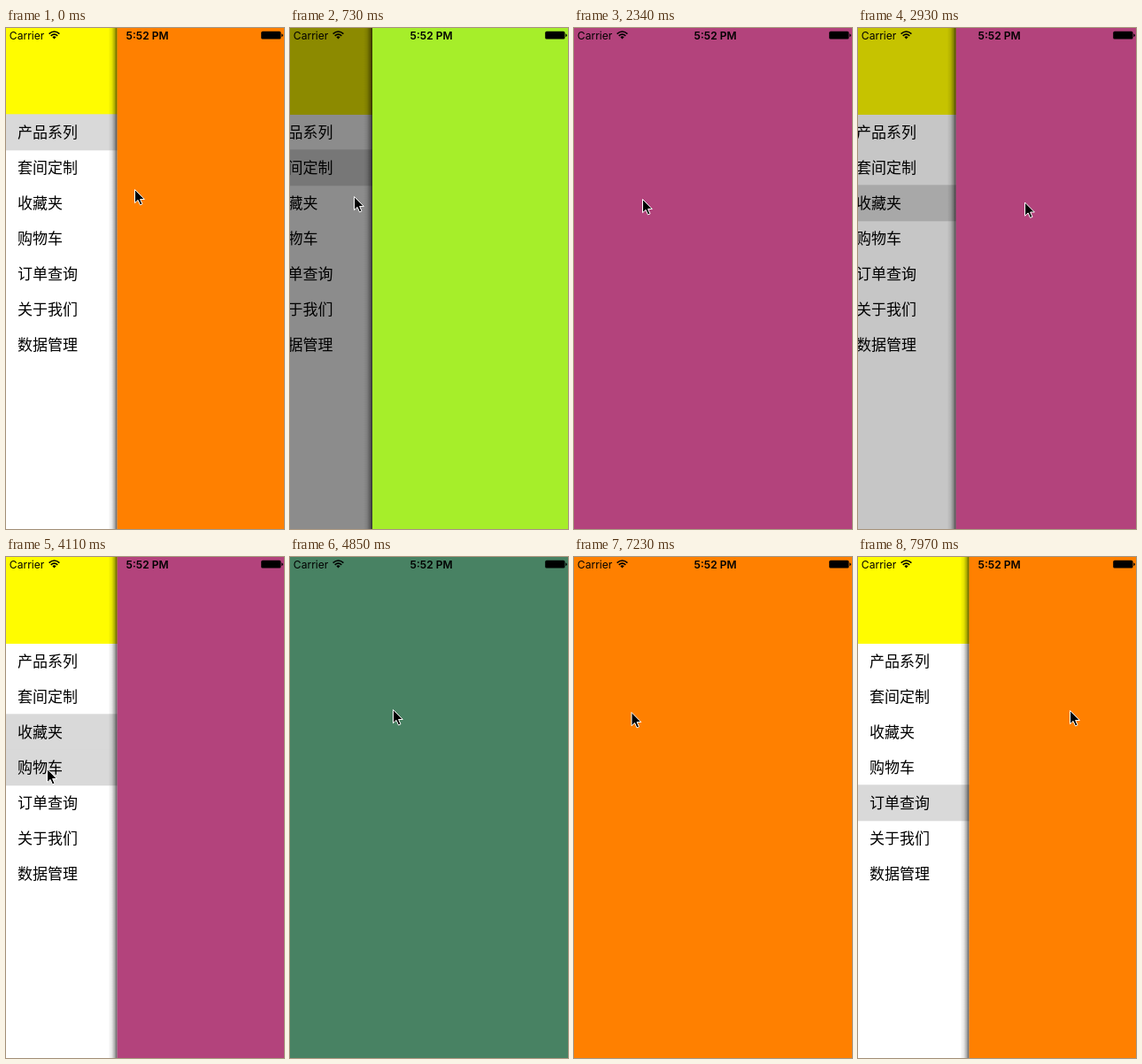
Animation, 314 px wide and 566 px high, one loop 8000 ms. Source, as an HTML page:

```html
<!DOCTYPE html>
<html lang="zh-CN">
<head>
<meta charset="utf-8">
<title>Drawer menu</title>
<style>
  html, body { margin: 0; width: 100%; height: 100%; overflow: hidden; background: #000; }
  svg { display: block; width: 100vw; height: 100vh; }
  .row { font: 17px "Noto Sans CJK SC", "Noto Sans CJK", sans-serif; }
  .status { font: 12.1px Inter, sans-serif; }
  .time { font-weight: 600; text-anchor: middle; }
</style>
</head>
<body>
<svg viewBox="0 0 314 566" xmlns="http://www.w3.org/2000/svg">
  <defs>
    <linearGradient id="shade">
      <stop offset="0" stop-opacity="0"/>
      <stop offset=".4" stop-opacity=".1"/>
      <stop offset=".75" stop-opacity=".35"/>
      <stop offset="1" stop-opacity=".68"/>
    </linearGradient>
  </defs>
  <rect width="314" height="566"/>
  <g id="menu">
    <rect width="126" height="566" fill="#fff"/>
    <rect width="126" height="98" fill="#fffc00"/>
    <g id="rows"></g>
  </g>
  <g id="page">
    <rect x="-10" width="10" height="566" fill="url(#shade)"/>
    <rect id="paper" width="314" height="566"/>
  </g>
  <g id="statusBar">
    <text class="status" x="3.8" y="12.6">Carrier</text>
    <g fill="none" stroke="#000" stroke-width="1.6">
      <path d="M48.6 6.6Q54.5 1.4 60.4 6.6M50.7 8.8Q54.5 5.5 58.3 8.8"/>
      <path d="M52.4 10.2Q54.5 8.4 56.6 10.2L54.5 12.4Z" fill="#000" stroke="none"/>
    </g>
    <text class="status time" x="159.6" y="12.6">5:52 PM</text>
    <rect x="288.2" y="3.8" width="22.3" height="8.8" rx="1.6"/>
    <path d="M311.3 6.6Q312.8 6.8 312.8 8.3T311.3 10Z"/>
  </g>
  <path id="cursor" d="M0 0V15.2L3.6 11.9L6 17.4L8.5 16.3L6.1 11H10.8Z" stroke="#fff" stroke-linejoin="round"/>
</svg>
<script>
const LOOP = 8000, STEP = 147.6, LEAD = 25, OPEN = 314 * .4, SLIDE = 3;
const labels = ["产品系列", "套间定制", "收藏夹", "购物车", "订单查询", "关于我们", "数据管理"];

// Every round: tap a row, the drawer shuts on a new page, then a drag pulls it open.
// press and drag are steps; tap, grab and release are pointer positions.
const rounds = [
  { press: -9, row: 0, colour: "#ff8000", tap: [46, 118], drag: -3, grab: [60, 182], release: [145, 182] },
  { press: 4, row: 1, colour: "#a6ee2a", tap: [48, 159], drag: 7, grab: [72, 190], release: [198, 193] },
  { press: 12, row: 2, colour: "#b3437c", tap: [44, 193], drag: 18, grab: [77, 193], release: [203, 197] },
  { press: 28, row: 3, colour: "#488263", tap: [46, 239], drag: 34, grab: [116, 172], release: [240, 222] },
  { press: 42, row: 4, colour: "#ff8000", tap: [62, 276], drag: 51, grab: [64.5, 175], release: [239, 173] }
];

const $ = id => document.getElementById(id);
const clamp = k => Math.min(1, Math.max(0, k));
const easeInOut = k => k * k * (3 - 2 * k);
const easeOut = k => 1 - (1 - k) ** 1.94;

// The pointer rests between strokes and takes at most four steps back to the menu.
const stops = rounds.flatMap(({ press, drag, tap, grab, release }, i) => {
  const next = rounds[i + 1];
  const leave = next ? Math.max(drag + SLIDE, next.press - 5) : LOOP;
  return [
    { at: press - 1, pos: tap }, { at: press, pos: tap },
    { at: drag - 2, pos: grab }, { at: drag, pos: grab },
    { at: drag + SLIDE, pos: release }, { at: leave, pos: release }
  ];
});

function pointerAt(step) {
  const next = stops.findIndex(stop => stop.at > step);
  const a = stops[next - 1], b = stops[next];
  const k = easeOut((step - a.at) / (b.at - a.at));
  return a.pos.map((v, i) => v + (b.pos[i] - v) * k);
}

function opennessAt(step, { press, drag }) {
  const closed = easeInOut(clamp((step - press) / SLIDE));
  const pulled = easeOut(clamp((step - drag) / SLIDE));
  return Math.max(1 - closed, pulled);
}

$("rows").innerHTML = labels.map((label, i) =>
  `<rect class="mark" y="${97.3 + 40 * i}" width="126" height="41" fill="#d9d9d9"/>`).join("") +
  labels.map((label, i) => `<text class="row" x="13" y="${124 + 40 * i}">${label}</text>`).join("");
const marks = document.querySelectorAll(".mark");

function draw(ms) {
  const step = Math.floor((ms % LOOP + LEAD) / STEP);
  const current = rounds.filter(round => round.press < step).pop();
  const pressed = rounds.find(round => round.press === step) || current;
  const openness = opennessAt(step, current);
  const edge = OPEN * openness;
  const [x, y] = pointerAt(step);

  marks.forEach((mark, i) => {
    const lit = i === current.row || i === pressed.row;
    mark.setAttribute("visibility", lit ? "visible" : "hidden");
  });
  $("menu").setAttribute("transform", `translate(${edge - OPEN})`);
  $("menu").setAttribute("opacity", openness ** 2);
  $("page").setAttribute("transform", `translate(${edge})`);
  $("paper").setAttribute("fill", current.colour);
  $("cursor").setAttribute("transform", `translate(${x + .5} ${y + .5})`);
}

const start = performance.now();
function tick() {
  draw(performance.now() - start);
  requestAnimationFrame(tick);
}
tick();
</script>
</body>
</html>
```
